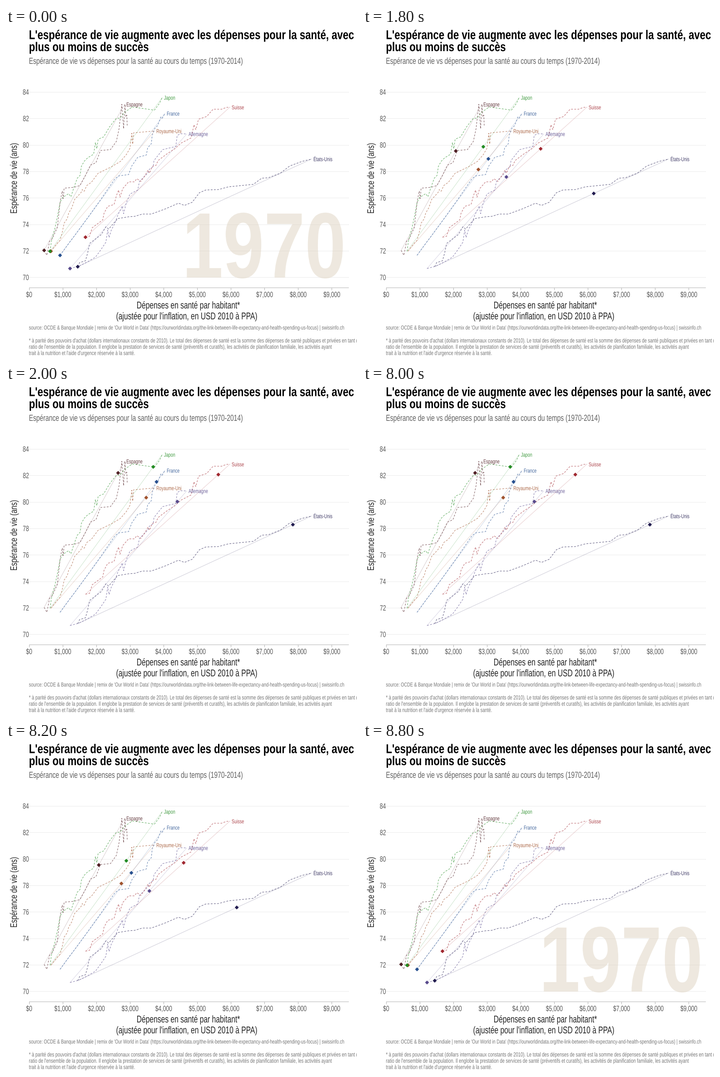
Write a matplotlib script that moves like this. It is 773 px wide and 725 px high and loops after 10 s.

```python
import matplotlib.pyplot as plt
import numpy as np
from matplotlib.animation import FuncAnimation
from matplotlib.patches import PathPatch
from matplotlib.textpath import TextPath
from matplotlib.transforms import Affine2D

W, H, DPI = 773, 725, 64
PX = 72 / DPI
FRAMES, INTERVAL = 50, 200
NARROW = {"normal": 0.72, "bold": 0.79}  # condensed faces

fig = plt.figure(figsize=(W / DPI, H / DPI), dpi=DPI, facecolor="white")
ax = fig.add_axes([0, 0, 1, 1])
ax.set(xlim=(0, W), ylim=(H, 0))
ax.axis("off")


def text(x, y, s, size, color, weight="normal", ha="left", angle=0, **kw):
    font = {"family": "Liberation Sans", "weight": weight}
    path = TextPath((0, 0), s, size=size, prop=font)
    box = path.get_extents()
    shift = {"left": 0, "center": (box.x0 + box.x1) / 2, "right": box.x1}[ha]
    place = (Affine2D().translate(-shift, 0).scale(NARROW[weight], -1)
             .rotate_deg(-angle).translate(x, y))
    patch = PathPatch(place.transform_path(path), fc=color, lw=0, **kw)
    return ax.add_patch(patch)


def line(points, color, width, **kw):
    xs, ys = zip(*points)
    return ax.plot(xs, ys, color=color, lw=width * PX, **kw)[0]


def px(dollars):
    return 50.8 + dollars * 0.07407


def py(years):
    return 549.4 - (years - 70) * 29.18


# Headings and notes
text(50.5, 24.5, "L'espérance de vie augmente avec les dépenses pour la santé, avec",
     28.1, "black", "bold")
text(50.5, 51, "plus ou moins de succès", 28.1, "black", "bold")
text(50.5, 79, "Espérance de vie vs dépenses pour la santé au cours du temps (1970-2014)",
     19.3, "#606060")
text(50.5, 664.5, "source: OCDE & Banque Mondiale | remix de 'Our World in Data' "
     "(https://ourworldindata.org/the-link-between-life-expectancy-and-health-"
     "spending-us-focus) | swissinfo.ch", 12.8, "#777777")
notes = [
    "* à parité des pouvoirs d'achat (dollars internationaux constants de 2010). "
    "Le total des dépenses de santé est la somme des dépenses de santé publiques "
    "et privées en tant que",
    "ratio de l'ensemble de la population. Il englobe la prestation de services de "
    "santé (préventifs et curatifs), les activités de planification familiale, "
    "les activités ayant",
    "trait à la nutrition et l'aide d'urgence réservée à la santé.",
]
for i, note in enumerate(notes):
    text(50.5, 693 + 13.8 * i, note, 13.1, "#777777")

# Axes
for age in range(70, 85, 2):
    y = py(age)
    line([(51, y), (754, y)], "#c4c4c4", 1, ls=(0, (1, 2)), zorder=1)
    text(50, y + 6, str(age), 16.9, "#555555", ha="right")
line([(50.5, 571.5), (754, 571.5)], "#b3b3b3", 1, zorder=1)
for usd in range(0, 9001, 1000):
    x = px(usd)
    line([(x, 571.5), (x, 576.5)], "#b3b3b3", 1, zorder=1)
    text(x, 593, f"${usd:,}", 16.9, "#555555", ha="center")
text(402, 618, "Dépenses en santé par habitant*", 21.7, "#222222", ha="center")
text(398, 642, "(ajustée pour l'inflation, en USD 2010 à PPA)", 21.7, "#222222",
     ha="center")
text(24, 331, "Espérance de vie (ans)", 21, "#222222", ha="center", angle=90)

# Yearly trails, in stage pixels
germany = [(141, 530), (160, 525), (180, 515), (197, 505), (208, 490), (220, 472),
           (224, 445), (227, 462), (232, 445), (240, 430), (246, 413), (256, 392),
           (259, 409), (265, 385), (273, 366), (290, 357), (294, 338), (312, 320),
           (316, 311), (324, 306), (326, 292), (345, 268), (374, 261), (377, 237),
           (384, 233), (398, 233.3)]
usa = [(158, 526), (162, 517), (175, 513), (180, 495), (184, 475), (210, 455),
       (220, 438), (226, 443), (246, 420), (270, 416), (284, 415), (300, 410),
       (320, 410), (350, 399), (380, 386), (393, 391), (410, 384), (426, 363),
       (440, 357), (468, 356), (490, 350), (545, 344.5), (563, 331), (578, 330),
       (604, 320), (625, 304), (652, 294), (673, 288.7)]
france = [(119, 501), (140, 472), (150, 459), (180, 418), (210, 376), (240, 332),
          (248, 326), (270, 323), (277, 304), (290, 285), (309, 280), (312, 264),
          (320, 255), (322, 236), (328, 221), (334, 215), (341, 196), (344, 199),
          (350, 188.3)]
uk = [(99, 492), (112, 475), (119, 468), (124, 450), (128, 430), (135, 420),
      (138, 408), (145, 396), (151, 378), (165, 363), (168, 356), (172, 360),
      (178, 347), (188, 340), (203, 320), (232, 306), (252, 294), (265, 279),
      (273, 265), (277, 232), (279, 256), (281, 231), (327, 227)]
japan = [(97, 492), (100, 470), (108, 440), (114, 412), (119, 385), (124, 374),
         (138, 365), (143, 372), (150, 350), (157, 331), (163, 325), (166, 305),
         (172, 294), (180, 286), (193, 278), (197, 252), (200, 266), (203, 245),
         (215, 240), (228, 218), (242, 200), (252, 198), (261, 186), (278, 174),
         (327, 181), (338, 166), (344, 153.3)]
spain = [(84, 490), (90, 501), (96, 470), (102, 464), (113, 440), (117, 403),
         (120, 378), (124, 359), (126, 376), (128, 353), (150, 351), (163, 347),
         (175, 325), (186, 302), (198, 297), (208, 270), (230, 268), (243, 250),
         (249, 222), (255, 168), (259, 222), (262, 168), (264, 196), (266, 192),
         (267, 215)]
swiss = [(175, 461), (184, 459), (190, 440), (213, 423), (216, 408), (224, 393),
         (238, 389), (243, 370), (248, 357), (251, 373), (257, 354), (270, 339),
         (283, 339), (288, 332), (297, 338), (305, 327), (313, 313), (316, 320),
         (322, 305), (330, 303), (335, 292), (355, 277), (372, 266), (385, 254),
         (408, 242), (414, 213), (418, 224), (424, 201), (442, 195), (456, 179),
         (475, 179), (485, 175), (493, 174.5)]

countries = [
    ("Allemagne", germany, "#584a8c", (398, 233.3)),
    ("États-Unis", usa, "#221c4f", (673, 288.7)),
    ("France", france, "#27508f", (350, 188.3)),
    ("Royaume-Uni", uk, "#a0522d", (327, 227)),
    ("Japon", japan, "#228b22", (344, 153.3)),
    ("Espagne", spain, "#4f1f24", (261, 168)),
    ("Suisse", swiss, "#a02830", (493, 174.5)),
]
for name, trail, color, end in countries:
    line([trail[0], end], color, 0.8, alpha=0.28, zorder=3)
    line(trail, color, 1, alpha=0.75, ls=(0, (4, 3)), dash_capstyle="butt", zorder=4)
    text(end[0] + 4, end[1] + 4.7, name, 12.6, color, alpha=0.85, zorder=5)

# Moving parts
starts = np.array([c[1][0] for c in countries], float)
ends = np.array([c[3] for c in countries], float)
dots = ax.scatter(*starts.T, marker="D", s=(6.2 * PX) ** 2, lw=0, zorder=6,
                  c=[c[2] for c in countries])
years = [text(570, 550, y, 205, "#dfd3c0", "bold", "center", alpha=0.5, zorder=2)
         for y in ("1970", "2014")]


def ease(t):
    return 2 * t * t if t < 0.5 else 1 - 2 * (1 - t) ** 2


def update(i):
    t = min(max(min(i - 6, 44 - i) / 5, 0), 1)
    dots.set_offsets(starts + (ends - starts) * ease(t))
    years[0].set_visible(t == 0)
    years[1].set_visible(t == 1)
    return [dots, *years]


anim = FuncAnimation(fig, update, frames=FRAMES, interval=INTERVAL, repeat=True,
                     repeat_delay=0)
plt.show()
```
